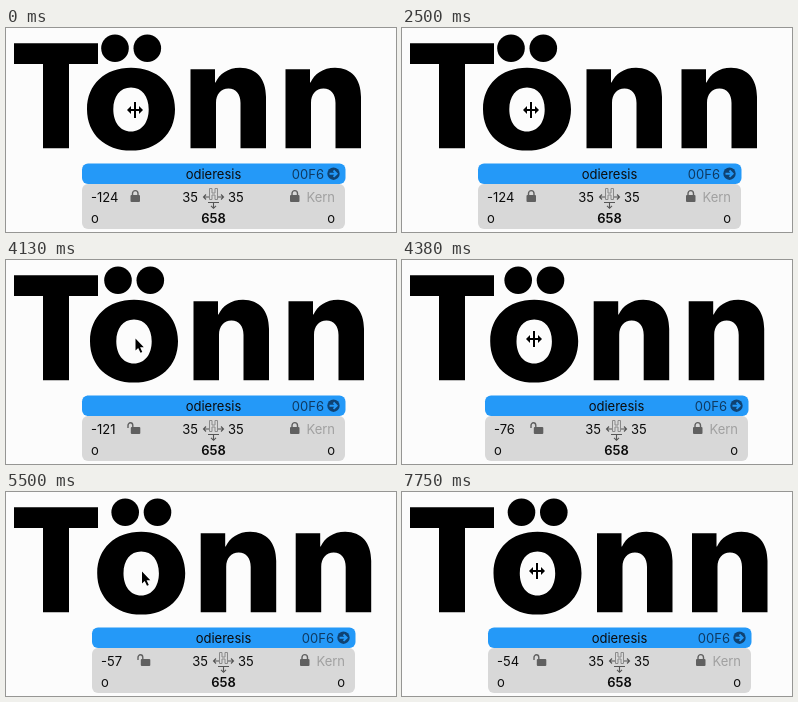
These frames come from a looping animation (390 by 204 pixels, 8000 ms). An HTML page:

```html
<!DOCTYPE html>
<html lang="en">
<head>
<meta charset="utf-8">
<title>Kerning</title>
<style>
  html, body { margin: 0; width: 100%; height: 100%; overflow: hidden; background: #fcfcfc; }
  svg { display: block; width: 390px; height: 204px; }
  text { font: 400 13px Inter, "Open Sans", sans-serif; fill: #0c0c0c; }
  .mid { text-anchor: middle; }
  .end { text-anchor: end; }
  .bold { font-weight: 600; }
  .line { fill: none; stroke: #555; stroke-width: 1.1; }
</style>
</head>
<body>
<svg viewBox="0 0 390 204">
  <defs>
    <path id="n" d="M0 120.300V41.300H24.500V54.500H25C29 46 37.500 39.800 49.500 39.800C66 39.800 75.500 51 75.500 69V120.300H50V75C50 66 45.500 60.500 38 60.500C30.500 60.500 25.500 66 25.500 75V120.300Z"/>
    <g id="lock" fill="#606060">
      <rect y="5" width="9.500" height="7" rx="1"/>
      <path d="M2 5.500V3.500a2.750 2.900 0 0 1 5.500 0V5.500" fill="none" stroke="#606060" stroke-width="1.400"/>
    </g>
    <g id="unlock" fill="#606060">
      <rect x="2.800" y="5" width="9.500" height="7" rx="1"/>
      <path d="M0 6V3.500a2.400 2.700 0 0 1 4.800 0V5.500" fill="none" stroke="#606060" stroke-width="1.400"/>
    </g>
    <path id="resizeShape" d="M-8 0L-4 -4V-1H-1V-8H1V-1H4V-4L8 0L4 4V1H1V8H-1V1H-4V4Z"/>
    <path id="arrowShape" d="M1 1.500V13.500L3.700 11L6 15.700L7.800 14.900L5.600 10.200H9.300Z"/>
  </defs>

  <path d="M8 15.200H92V36H63V120.300H37V36H8Z"/>
  <g id="glyphs">
    <circle cx="109" cy="20.300" r="13.800"/>
    <circle cx="141.300" cy="20.300" r="13.800"/>
    <path fill-rule="evenodd" d="M125 39.800C151 39.800 169 56.500 169 81.200S151 122.600 125 122.600S81 106 81 81.200S99 39.800 125 39.800ZM125 59.500C114 59.500 107.300 68.500 107.300 81.200S114 103.500 125 103.500S142.700 94 142.700 81.200S136 59.500 125 59.500Z"/>
    <use href="#n" x="184.500"/>
    <use href="#n" x="279.500"/>
  </g>

  <g id="panel">
    <rect x="76" y="156" width="263" height="45" rx="6" fill="#d8d8d8"/>
    <rect x="76" y="135.500" width="263.500" height="20.500" rx="6" fill="#2499f8"/>
    <text class="mid" x="207.500" y="151">odieresis</text>
    <text class="end" x="318" y="151" style="fill:#0f3a62">00F6</text>
    <circle cx="327.500" cy="145.700" r="6.200" fill="#0f4272"/>
    <path d="M323.500 145.700H330M327.500 142.500L330.700 145.700L327.500 148.900" fill="none" stroke="#2499f8" stroke-width="1.900"/>

    <text id="kern" x="85" y="174"></text>
    <use id="closed" href="#lock" x="124.500" y="162"/>
    <use id="open" href="#unlock" x="122" y="162"/>
    <text class="end" x="192" y="174">35</text>
    <text x="222" y="174">35</text>
    <g class="line">
      <path d="M203.500 160.500H206V165H209V160.500H211.500V171.500H209V167H206V171.500H203.500Z" stroke="#8a8a8a" stroke-width="1"/>
      <path d="M197.500 169H203M200 166.500L197.500 169L200 171.500M212 169H217.500M215 166.500L217.500 169L215 171.500"/>
      <path d="M202 174.500H213M207.500 174.500V180M205 177.800L207.500 180.300L210 177.800"/>
    </g>
    <use href="#lock" x="284" y="162"/>
    <text class="end" x="329" y="174" style="fill:#a0a0a0">Kern</text>
    <text x="85" y="195">o</text>
    <text class="mid bold" x="207.500" y="195">658</text>
    <text class="end" x="329" y="195">o</text>
  </g>

  <g id="cursor" stroke="#fff" stroke-width="2" stroke-linejoin="round" paint-order="stroke">
    <use id="resize" href="#resizeShape"/>
    <use id="arrow" href="#arrowShape"/>
  </g>
</svg>
<script>
  const LOOP = 8000, START_KERN = -124, PX_PER_UNIT = 0.15;

  // The panel trails the dragged letters slightly.
  const steps = [
    { at: 0,    shift: 0,    kern: -124, x: 129,   y: 82, arrow: false, open: false },
    { at: 2880, x: 128, open: true },
    { at: 3880, y: 79, arrow: true },
    { at: 4000, shift: 0.5, y: 78 },
    { at: 4130, shift: 3,    kern: -121, x: 128.5, y: 77 },
    { at: 4250, shift: 6.5,  kern: -90,  x: 131,   y: 78 },
    { at: 4380, shift: 7.2,  kern: -76,  x: 132,   y: 79, arrow: false },
    { at: 4500, shift: 7.6,  kern: -73 },
    { at: 5380, shift: 8.8,  x: 133.5, y: 78, arrow: true },
    { at: 5500, shift: 10.2, kern: -57,  x: 135 },
    { at: 5630, shift: 10.5, kern: -54,  y: 79, arrow: false }
  ];

  const el = id => document.getElementById(id);
  const move = (id, x, y = 0) => el(id).setAttribute("transform", `translate(${x} ${y})`);
  const show = (id, on) => el(id).setAttribute("visibility", on ? "visible" : "hidden");

  function draw(time) {
    const s = Object.assign({}, ...steps.filter(step => step.at <= time));
    move("glyphs", s.shift);
    move("panel", Math.floor((s.kern - START_KERN) * PX_PER_UNIT));
    move("cursor", s.x, s.y);
    el("kern").textContent = s.kern;
    show("closed", !s.open);
    show("open", s.open);
    show("arrow", s.arrow);
    show("resize", !s.arrow);
  }

  const start = performance.now();
  function tick() {
    draw((performance.now() - start) % LOOP);
    requestAnimationFrame(tick);
  }
  tick();
</script>
</body>
</html>
```
